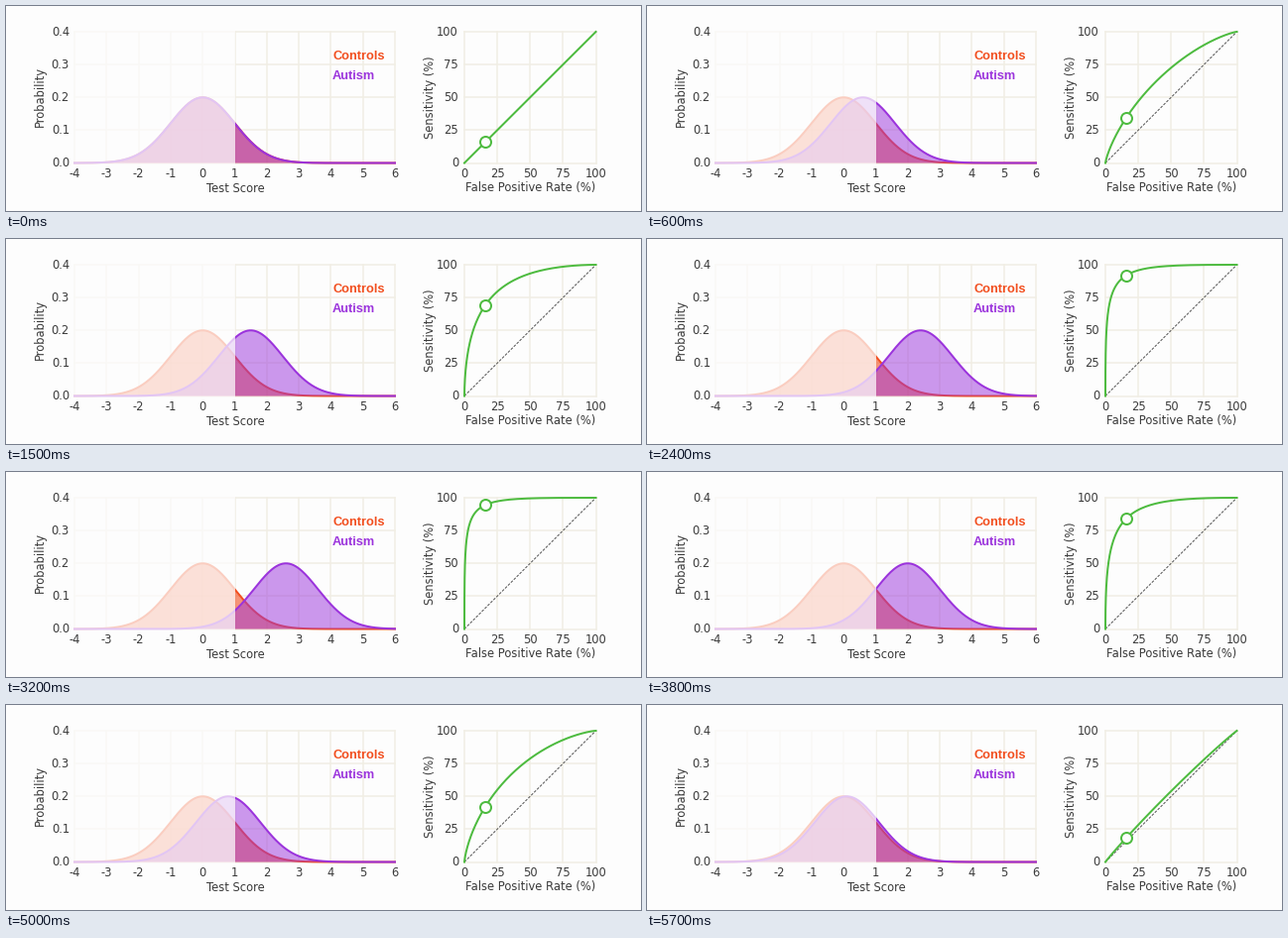
Recreate the animation shown at these times as a matplotlib script. Size 640 by 207 pixels, loop 5.8 s.

```python
import math

import numpy as np
import matplotlib.pyplot as plt
from matplotlib.animation import FuncAnimation
from matplotlib.patches import Polygon, Rectangle

W, H = 640, 207
FRAMES, INTERVAL = 58, 100
STEP = 0.1          # shift of the mean per frame
CUTOFF = 1          # decision threshold

BG = "#fdfdfd"
GRID = "#f1eee4"
TEXT = "#3a3a3a"
ORANGE = "#f24e1e"
PURPLE = "#9b33dc"
GREEN = "#4dbb3f"

LEFT, RIGHT = (69, 392), (462, 594.5)
TOP, BOTTOM = 26, 158.5


def score_x(v):
    return LEFT[0] + (np.asarray(v) + 4) * (LEFT[1] - LEFT[0]) / 10


def prob_y(p):
    return BOTTOM - np.asarray(p) * (BOTTOM - TOP) / 0.4


def rate_x(r):
    return RIGHT[0] + np.asarray(r) * (RIGHT[1] - RIGHT[0])


def rate_y(r):
    return BOTTOM - np.asarray(r) * (BOTTOM - TOP)


def bell(x, mean):
    return 0.2 * np.exp(-(x - mean) ** 2 / 2)


def tail(t):
    """Share of a standard normal that lies above t."""
    return 0.5 * math.erfc(t / math.sqrt(2))


fig = plt.figure(figsize=(W / 72, H / 72), dpi=72, facecolor=BG)
ax = fig.add_axes([0, 0, 1, 1])
ax.set_xlim(0, W)
ax.set_ylim(H, 0)
ax.axis("off")


def label(x, y, s, **kw):
    style = dict(family="DejaVu Sans", size=11.5, color=TEXT,
                 ha="center", va="center", zorder=8)
    ax.text(x, y, s, **{**style, **kw})


def line(xs, ys, color, width, z, **kw):
    return ax.plot(xs, ys, color=color, lw=width, zorder=z, **kw)[0]


def grid(span, xs, ys):
    for x in xs:
        line([x, x], [TOP, BOTTOM], GRID, 1.5, 1)
    for y in ys:
        line(span, [y, y], GRID, 1.5, 1)


# Static parts of the score plot
scores = range(-4, 7)
probs = [0, 0.1, 0.2, 0.3, 0.4]
grid(LEFT, score_x(list(scores)), prob_y(probs))
for v in scores:
    label(score_x(v), 169.5, str(v))
for p in probs:
    label(64, prob_y(p), f"{p:.1f}", ha="right")
label(231, 187.5, "Test Score", va="baseline")
label(34, 91, "Probability", rotation=90)
for name, y, color in (("Controls", 54, ORANGE), ("Autism", 73.5, PURPLE)):
    label(329, y, name, color=color, ha="left", va="baseline",
          family="Liberation Sans", weight="bold", size=12.7)

# Static parts of the ROC plot
rates = np.linspace(0, 1, 5)
grid(RIGHT, rate_x(rates), rate_y(rates))
for r in rates:
    label(rate_x(r), 169.5, f"{100 * r:.0f}")
    label(456, rate_y(r), f"{100 * r:.0f}", ha="right")
label(528.5, 187.5, "False Positive Rate (%)", va="baseline")
label(427, 92, "Sensitivity (%)", rotation=90)
line(RIGHT, [BOTTOM, TOP], "#444444", 0.9, 2, linestyle=(0, (3, 1.6)))

# Distributions, faded below the cutoff
xs = np.linspace(-4, 6, 301)


def outline(mean):
    return np.column_stack([score_x(xs), prob_y(bell(xs, mean))])


def area(mean):
    ends = [[LEFT[1], BOTTOM], [LEFT[0], BOTTOM]]
    return np.vstack([outline(mean), ends])


def curve(color, alpha, z):
    fill = ax.add_patch(Polygon(area(0), fc=color, ec="none",
                                alpha=alpha, zorder=z))
    return fill, line(*outline(0).T, color, 2, z + 0.5)


curve(ORANGE, 0.6, 3)
case_fill, case_line = curve(PURPLE, 0.5, 4)
ax.add_patch(Rectangle((LEFT[0] - 2, TOP - 2),
                       score_x(CUTOFF) - LEFT[0] + 2, BOTTOM - TOP + 4,
                       fc=BG, ec="none", alpha=0.73, zorder=5))

# ROC curve and its operating point
ts = np.linspace(-5, 8, 400)
fpr = np.array([tail(t) for t in ts])
roc = line([], [], GREEN, 2, 6)
point = line([], [], GREEN, 2, 7, marker="o", ms=11, mfc=BG, mec=GREEN, mew=2)


def update(i):
    d = STEP * min(i, FRAMES - i)
    case_fill.set_xy(area(d))
    case_line.set_data(*outline(d).T)
    tpr = np.array([tail(t - d) for t in ts])
    roc.set_data(rate_x(fpr), rate_y(tpr))
    point.set_data([rate_x(tail(CUTOFF))], [rate_y(tail(CUTOFF - d))])
    return case_fill, case_line, roc, point


anim = FuncAnimation(fig, update, frames=FRAMES, interval=INTERVAL,
                     repeat=True, repeat_delay=0, blit=False)
plt.show()
```
